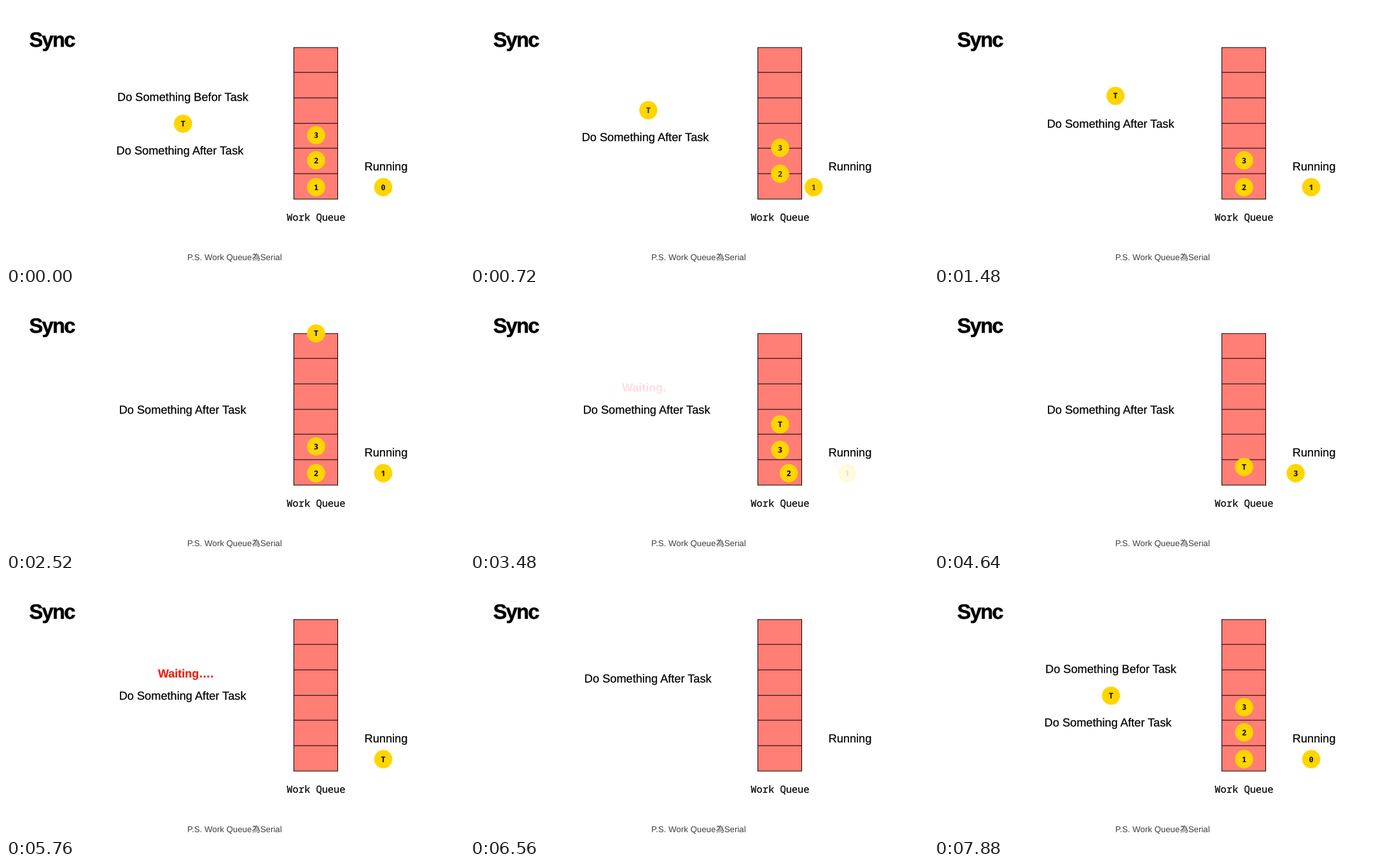
Recreate the animation shown at these times as an HTML page. Size 720 by 405 pixels, loop 7.92 s.

```html
<!DOCTYPE html>
<html lang="en">
<head>
<meta charset="utf-8">
<title>Sync</title>
<style>
  html, body { margin: 0; width: 100%; height: 100%; overflow: hidden; background: #fff; }
  svg { display: block; width: 720px; height: 405px; }
  text {
    font: 18.2px "Liberation Sans", Arial, sans-serif; text-rendering: geometricPrecision;
    fill: #000; stroke: #000; stroke-width: 0.25px;
  }
  .mid, .disc text { text-anchor: middle; }
  .title { font-size: 32.5px; font-weight: bold; letter-spacing: -1.6px; stroke-width: 0.6px; }
  .mono { font: 500 15.4px "Noto Sans Mono", monospace; }
  .note { font-size: 13.3px; font-family: "Liberation Sans", "Noto Sans CJK TC", "Noto Sans CJK", sans-serif; fill: #404040; stroke: none; }
  .wait { font-size: 18px; font-weight: bold; fill: #ee220c; stroke: #ee220c; }
  .disc circle { fill: #ffd500; }
  .disc text { stroke: none; }
  .disc .first { font: bold 12px "Noto Sans Mono", monospace; }
  .disc .zero { font: bold 11.5px "DejaVu Sans Mono", monospace; }
  .disc .later { font: bold 12px "Open Sans", sans-serif; }
</style>
</head>
<body>
<svg id="stage" viewBox="0 0 720 405">
  <text class="title" x="36.4" y="63.9">Sync</text>
  <rect x="452.5" y="65.2" width="69" height="237.9" fill="#ff7e75" stroke="#000"/>
  <path id="rows" stroke="#000"/>
  <text class="mono mid" x="487.4" y="336.5">Work Queue</text>
  <text x="563.6" y="258.4">Running</text>
  <text class="note" x="284.9" y="399">P.S. Work Queue為Serial</text>
</svg>
<script>
const LOOP = 7920, STEP = 40, FIRST = 480, PERIOD = 960, MOVE = 480, RESET = 7880;
const stage = document.getElementById("stage");

function add(parent, tag, attrs, text = "") {
  const el = document.createElementNS("http://www.w3.org/2000/svg", tag);
  for (const name in attrs) el.setAttribute(name, attrs[name]);
  el.textContent = text;
  return parent.appendChild(el);
}

document.getElementById("rows").setAttribute("d",
  [1, 2, 3, 4, 5].map(i => `M452 ${Math.floor(65.3 + 39.6 * i) + 0.2}h70`).join(""));

// One position per slide; null means the item is not on that slide.
const bottom = [487.5, 284.4], middle = [487.5, 242.4], upper = [487.5, 202.8], run = [593, 284.4];
const items = [];

function addText(cls, text, slides) {
  items.push({ el: add(stage, "text", { class: cls }, text), slides });
}

function addDisc(label, slides) {
  const el = add(stage, "g", { class: "disc" });
  add(el, "circle", { r: 14.3 });
  const first = add(el, "text", { class: label === "0" ? "zero" : "first", y: 4.4 }, label);
  const later = label === "0" ? null : add(el, "text", { class: "later", y: 4.4 }, label);
  items.push({ el, slides, first, later });
}

const after = [277.6, 191.3];
addText("mid", "Do Something Befor Task", [[278, 149.3]]);
addText("mid", "Do Something After Task",
  [[273.5, 233.3], after, after, after, after, after, after, [280.4, 155.8]]);
["Waiting.", "Waiting..", "Waiting…", "Waiting…."].forEach((text, i) => {
  const slides = [];
  slides[i + 3] = [238.9, 155.8];
  addText("wait", text, slides);
});
addDisc("0", [run]);
addDisc("1", [bottom, run, run, run]);
addDisc("2", [middle, bottom, bottom, bottom, run]);
addDisc("3", [upper, middle, middle, middle, bottom, run]);
addDisc("T", [[278.3, 184.7], [282.5, 142.4], [487.5, 44.5], upper, middle, bottom, run]);

const clamp = v => Math.min(1, Math.max(0, v));

// cubic-bezier(.42, 0, .58, 1)
function ease(x) {
  x = clamp(x);
  if (x === 0 || x === 1) return x;
  let lo = 0, hi = 1, s = 0.5;
  for (let i = 0; i < 24; i++) {
    s = (lo + hi) / 2;
    const bx = 3 * s * (1 - s) * (0.42 * (1 - s) + 0.58 * s) + s ** 3;
    if (bx < x) lo = s; else hi = s;
  }
  return s * s * (3 - 2 * s);
}

function draw(now) {
  let t = Math.floor((now % LOOP) / STEP + 0.001) * STEP;
  if (t >= RESET) t = 0;
  const slide = Math.max(0, Math.floor((t - FIRST) / PERIOD));
  const p = clamp((t - FIRST - slide * PERIOD) / MOVE);
  const e = ease(p);

  for (const { el, slides, first, later } of items) {
    const from = slides[slide], to = slides[slide + 1];
    const a = from || to, b = to || from;
    // Leaving takes the first third of a move, entering the last third.
    const alpha = !a ? 0 : from && to ? 1 : from ? 1 - ease(p * 3) : ease(p * 3 - 2);
    el.setAttribute("opacity", alpha);
    if (a) {
      const [x, y] = a.map((v, i) => v + (b[i] - v) * e);
      el.setAttribute("transform", `translate(${x} ${y})`);
    }
    if (later) {
      const mix = slide ? 1 : e;
      first.setAttribute("opacity", 1 - mix);
      later.setAttribute("opacity", mix);
    }
  }
}

function tick(now) {
  draw(now);
  requestAnimationFrame(tick);
}
draw(0);
requestAnimationFrame(tick);
</script>
</body>
</html>
```
